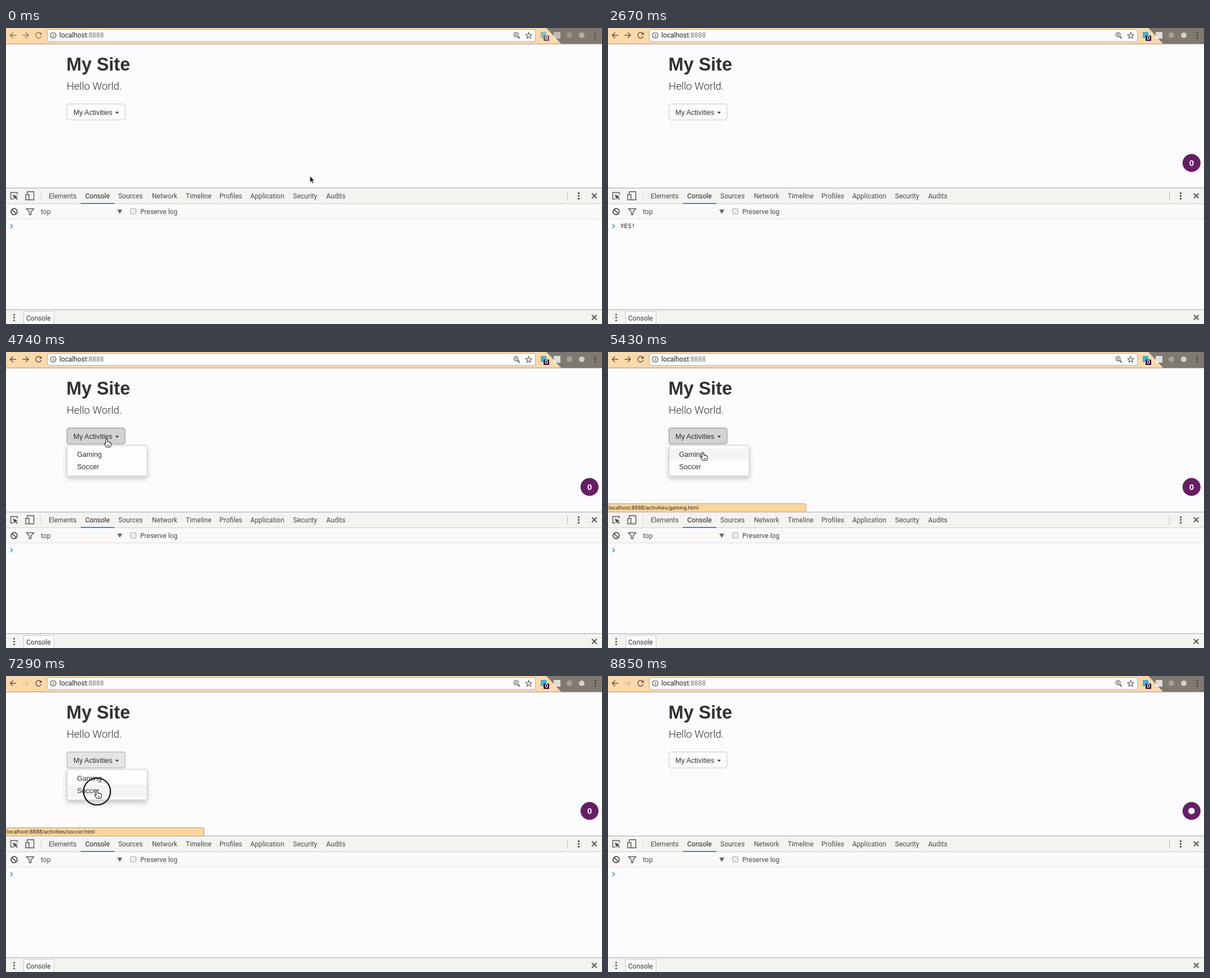
An HTML page for the animation above (8880 ms loop, 1061 by 528 pixels).

```html
<!DOCTYPE html>
<html lang="en">
<head>
<meta charset="utf-8">
<title>My Site</title>
<style>
  html, body { margin: 0; width: 100%; height: 100%; overflow: hidden; background: #fcfcfe; }
  svg { display: block; }
  text { white-space: pre; }
  .ui { font: 12px Roboto, "Open Sans", sans-serif; fill: #4a4a4a; }
  .page { font: 12.6px "Liberation Sans", Arial, sans-serif; fill: #2e3230; }
  .line { fill: none; stroke: #555; stroke-width: 1.4; }
</style>
</head>
<body>
<svg width="1061" height="528" viewBox="0 0 1061 528">
  <defs>
    <filter id="shadow" x="-20%" y="-30%" width="140%" height="190%">
      <feDropShadow dx="0" dy="5" stdDeviation="4.5" flood-opacity=".2"/>
    </filter>
  </defs>
  <rect width="1061" height="528" fill="#fcfcfe"/>

  <!-- browser bar -->
  <rect width="1061" height="28" fill="#fcd9a9"/>
  <path d="M962 0H1061V28H988Z" fill="#7f796f"/>
  <path d="M0 28.5H1061" stroke="#999"/>
  <rect x="73.5" y="2.5" width="869" height="21.5" rx="2.5" fill="#fdfdfe" stroke="#b3aaa4"/>
  <g id="nav">
    <path class="line" d="M18 13H7.5M12.5 8L7.5 13L12.5 18"/>
    <path class="line" id="forward" d="M29.5 13H40M35 8L40 13L35 18"/>
    <path class="line" id="stop" d="M53.5 8.5L62.5 17.5M62.5 8.5L53.5 17.5"/>
    <g id="reload">
      <path class="line" d="M62 10A5 5 0 1 0 62.8 14.5"/>
      <path d="M63.5 7.5V12H59Z" fill="#555"/>
    </g>
  </g>
  <circle class="line" cx="84" cy="13" r="5" style="stroke-width:1.2"/>
  <path d="M84 12V16M84 9.8V11" stroke="#555" stroke-width="1.3"/>
  <text class="ui" x="95" y="17.2" style="fill:#222">localhost<tspan fill="#777">:8888</tspan></text>
  <path class="line" d="M911 15L914.5 18.5" style="stroke-width:2"/>
  <circle class="line" cx="908" cy="12" r="3.9" style="stroke-width:1.2"/>
  <path d="M906 12H910M908 10V14" stroke="#555"/>
  <path class="line" d="M930.500 8l1.500 3.600l3.900.3l-3 2.500l1 3.800l-3.400-2.100l-3.400 2.100l1-3.800l-3-2.500l3.900-.3z" style="stroke-width:1.1"/>
  <g id="extensions">
    <rect x="952" y="7" width="10" height="11" fill="#2fb9e6"/>
    <rect x="957" y="13.500" width="10" height="9.500" rx="1" fill="#330b35"/>
    <text x="962" y="21.300" text-anchor="middle" fill="#fff" style="font:bold 8.500px Inter,sans-serif">0</text>
    <g fill="#fff">
      <rect x="975" y="7" width="12" height="12" opacity=".75"/>
      <circle cx="1003" cy="13" r="5" opacity=".3"/>
      <circle cx="1025" cy="13" r="5" opacity=".65"/>
    </g>
    <g fill="#444"><circle cx="1049" cy="8.500" r="1.500"/><circle cx="1049" cy="13" r="1.500"/><circle cx="1049" cy="17.500" r="1.500"/></g>
  </g>

  <!-- page -->
  <text class="page" x="107.500" y="76" style="font-size:32.4px;font-weight:bold">My Site</text>
  <text x="108" y="110" fill="#2e3230" style="font:300 18.600px Roboto,'Open Sans',sans-serif">Hello World.</text>
  <rect id="button" x="108.500" y="135.500" width="103.500" height="28.500" rx="3.500"/>
  <text class="page" x="120" y="154.500">My Activities</text>
  <path d="M194.500 149.500H201L197.750 153Z" fill="#2e3230"/>
  <g id="menu">
    <rect x="108.500" y="166.500" width="143" height="54.500" rx="3.500" fill="#fdfdfe" stroke="#c6c6c8" filter="url(#shadow)"/>
    <rect id="row" x="109" width="142" height="22" fill="#f4f4f4"/>
    <text class="page" x="126.500" y="187.300">Gaming</text>
    <text class="page" x="126.500" y="209.300">Soccer</text>
  </g>
  <g id="bubble">
    <circle cx="1038.800" cy="240.700" r="16" fill="#671d65"/>
    <text id="count" x="1038.800" y="246" text-anchor="middle" fill="#fff" style="font:bold 15px 'Liberation Sans',Arial,sans-serif">0</text>
    <circle id="mark" cx="1038.800" cy="240.700" r="5.800" fill="#fff"/>
  </g>
  <g id="status">
    <path d="M-1 270.500H349.500Q352.500 270.500 352.500 273.500V286H-1Z" fill="#fcd59b" stroke="#b7a284"/>
    <text id="link" x="1" y="281" fill="#222" style="font:9px Inter,Roboto,sans-serif"></text>
  </g>

  <!-- developer tools -->
  <rect y="285" width="1061" height="28" fill="#f3f4f0"/>
  <path d="M0 285.500H1061M0 502.500H1061" stroke="#a5a5b8"/>
  <path d="M0 313.500H1061" stroke="#cfcfcf"/>
  <rect y="314" width="1061" height="26" fill="#f9faf8"/>
  <path d="M0 340.500H1061" stroke="#dedee0"/>
  <path class="line" d="M13 305H8.500V293.500H20V297"/>
  <path d="M12 297L21 300.500L17.800 302L21 305.200L19.500 306.500L16.500 303.300L15 306Z" fill="#555"/>
  <path class="line" d="M38 296V292H49.500V306.500H42M35 297H41V306.500H35Z"/>
  <path d="M62.500 292V308" stroke="#bbb" stroke-dasharray="1 1"/>
  <g id="tabs"></g>
  <rect x="133" y="312" width="60" height="2" fill="#3f83ee"/>
  <path d="M999.500 292V308" stroke="#bbb"/>
  <g fill="#555">
    <circle cx="1019.500" cy="294.500" r="1.700"/><circle cx="1019.500" cy="299.500" r="1.700"/><circle cx="1019.500" cy="304.500" r="1.700"/>
  </g>
  <path class="line" d="M1043 295L1051.500 303.500M1051.500 295L1043 303.500" style="stroke-width:1.900"/>
  <circle class="line" cx="14.500" cy="327.500" r="5.500" style="stroke-width:1.900"/>
  <path class="line" d="M10.700 323.700L18.300 331.300" style="stroke-width:1.900"/>
  <path class="line" d="M36.500 322.500H49.500L44.500 328V333H41.500V328Z"/>
  <text class="ui" x="62" y="332">top</text>
  <path d="M198 324H207L202.500 331.500Z" fill="#666"/>
  <rect x="221.500" y="322" width="10" height="10" rx="2" fill="#ececec" stroke="#a9a9a9"/>
  <text class="ui" x="239" y="332">Preserve log</text>
  <path d="M8 350L11.500 353.500L8 357" fill="none" stroke="#3f8ff0" stroke-width="1.700"/>
  <text id="entry" x="22" y="357" fill="#222" style="font:11px 'DejaVu Sans Mono',monospace"></text>
  <rect y="503" width="1061" height="25" fill="#f3f4f0"/>
  <path d="M31.500 528V505.500H85.500V528" fill="#fdfdfe" stroke="#c8c8c8"/>
  <text class="ui" x="36" y="522" style="fill:#333">Console</text>
  <g fill="#555">
    <circle cx="14.500" cy="511.500" r="1.600"/><circle cx="14.500" cy="516.500" r="1.600"/><circle cx="14.500" cy="521.500" r="1.600"/>
  </g>
  <path class="line" d="M1043 512L1051.500 520.500M1051.500 512L1043 520.500" style="stroke-width:1.900"/>

  <!-- pointer -->
  <g id="pointer">
    <circle id="ring" cy="2" r="24" fill="none" stroke="#111" stroke-width="2.200"/>
    <path id="arrow" d="M0 0V11.500L2.600 9.200L4.500 13.500L6.500 12.600L4.700 8.500H8.200Z" fill="#111" stroke="#fff" stroke-width=".9"/>
    <path id="hand" d="M-1.500 1Q0-1 1.500 1V5Q3 4 4 5.500Q5.500 5 6 6.500Q8 6 8 8V11L6.500 14.500H-.5L-4 9Q-4.500 7-2.500 7.500L-1.500 8.500Z M2 10V12.500M4.200 10V12.500" fill="#fff" stroke="#222" stroke-width="1.100" stroke-linejoin="round"/>
  </g>
</svg>
<script>
const LOOP = 8880;
const el = id => document.getElementById(id);
const show = (id, on) => { el(id).style.display = on ? '' : 'none'; };
const inAny = (t, spans) => spans.some(([from, to]) => t >= from && t < to);

const tabs = [['Elements', 76], ['Console', 141], ['Sources', 200], ['Network', 260], ['Timeline', 320],
  ['Profiles', 380], ['Application', 435], ['Security', 511], ['Audits', 570]];
el('tabs').innerHTML = tabs.map(([name, x]) =>
  `<text class="ui" x="${x}" y="304"${name === 'Console' ? ' style="fill:#222"' : ''}>${name}</text>`).join('');

// each load: start, end, time the counter replaces the mark
const loads = [[1020, 1470, 2050], [5590, 5850, 6300], [7420, 7680, Infinity]];
const clicks = [[400, 650], [4150, 4400], [5480, 5700], [6420, 6650], [7180, 7420]];
const menus = [[4350, 5690], [6600, 7520]];
const hidden = [[900, 3400], [8300, LOOP]];
const path = [[0, 541, 264], [3400, 541, 264], [3800, 180, 153], [4650, 180, 153], [5150, 169, 179],
  [5850, 169, 179], [6250, 178, 152], [6680, 178, 152], [7050, 162, 204], [LOOP, 162, 204]];

function pointerAt(t) {
  const i = path.findIndex(p => p[0] > t);
  const [t0, x0, y0] = path[i - 1], [t1, x1, y1] = path[i];
  const k = (t - t0) / (t1 - t0), e = k * k * (3 - 2 * k);
  return [x0 + (x1 - x0) * e, y0 + (y1 - y0) * e];
}

function draw(t) {
  const [x, y] = pointerAt(t);
  const visible = !inAny(t, hidden);
  const open = inAny(t, menus);
  const overButton = visible && x > 108 && x < 212 && y > 135 && y < 164;
  const item = !open || y < 172 ? -1 : y < 194 ? 0 : 1;

  const active = t >= 480;
  const loading = inAny(t, loads);
  el('nav').style.opacity = active ? 1 : 0.7;
  el('extensions').style.opacity = active ? 1 : 0.65;
  el('forward').style.opacity = t < 5690 ? 1 : 0.2;
  show('stop', loading);
  show('reload', !loading);

  const focused = open && t < 7180;
  const [fill, stroke] = focused ? ['#d3d3d4', '#8c8c8c']
    : open || overButton ? ['#e5e5e6', '#a9a9b0'] : ['#fdfdfe', '#c8c8ca'];
  el('button').setAttribute('fill', fill);
  el('button').setAttribute('stroke', stroke);
  show('menu', open);
  show('row', item >= 0);
  el('row').setAttribute('y', 172 + 22 * Math.max(item, 0));
  show('status', item >= 0);
  el('link').textContent = `localhost:8888/activities/${item === 1 ? 'soccer' : 'gaming'}.html`;

  const last = loads.filter(l => t >= l[0] + 100).pop();
  const counted = last && t >= last[2];
  show('bubble', last && t >= last[1] + 130);
  show('count', counted);
  show('mark', !counted);

  const typed = t < 3050 ? Math.floor((t - 2040) / 110) : 4 - Math.ceil((t - 3050) / 80);
  el('entry').textContent = 'YES!'.slice(0, Math.max(0, Math.min(4, typed)));

  const hand = overButton || item >= 0;
  show('pointer', visible);
  show('hand', hand);
  show('arrow', !hand);
  show('ring', inAny(t, clicks));
  el('pointer').setAttribute('transform', `translate(${x} ${y})`);
}

const start = performance.now();
function tick() {
  draw((performance.now() - start) % LOOP);
  requestAnimationFrame(tick);
}
draw(0);
requestAnimationFrame(tick);
</script>
</body>
</html>
```
